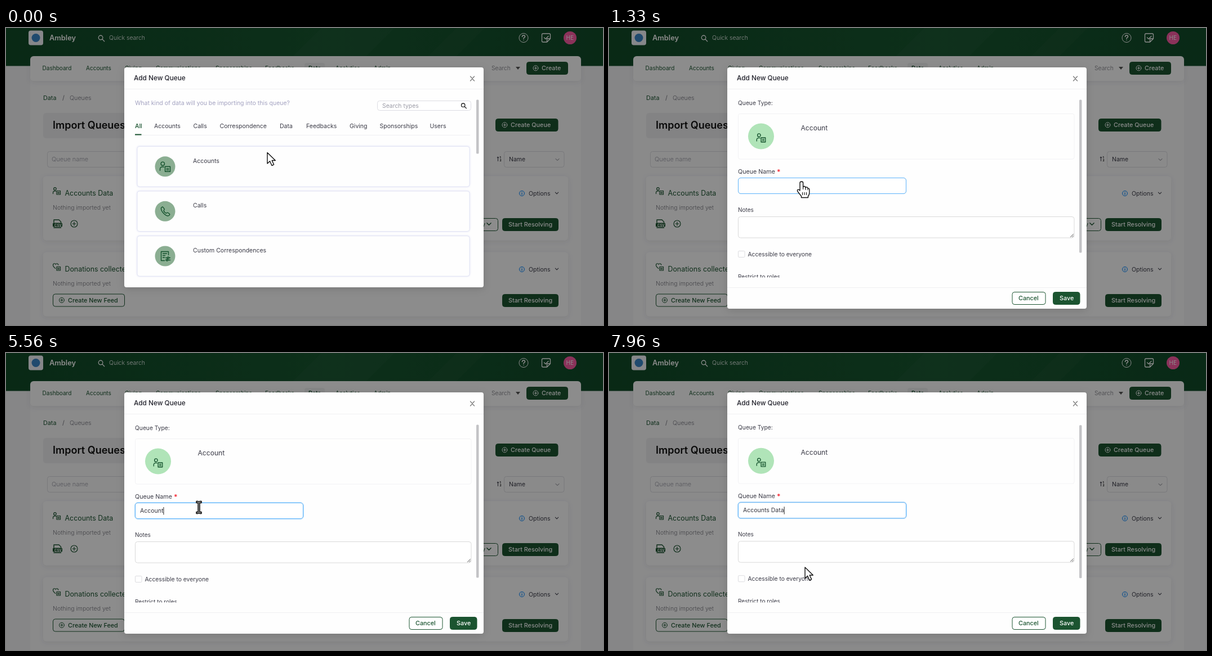
Animation, 1060 px wide and 528 px high, one loop 8 s. Source, as an HTML page:

```html
<!DOCTYPE html>
<html lang="en">
<head>
<meta charset="utf-8">
<title>Add New Queue</title>
<style>
html, body { margin: 0; width: 100%; height: 100%; overflow: hidden; background: #86868a; }
svg { display: block; width: 100%; height: 100%; }
text { font-family: Inter, "Open Sans", sans-serif; white-space: pre; }
</style>
</head>
<body>
<svg id="stage" viewBox="0 0 1060 528"></svg>
<script>
const LOOP = 8000;
const GREEN = '#1b5430', INK = '#3a3a46', MUTED = '#77777f', BLUE = '#5cb3fb';

const text = (x, y, s, size = 10.5, fill = INK, weight = 400) =>
  `<text x="${x}" y="${y}" font-size="${size}" fill="${fill}" font-weight="${weight}">${s}</text>`;
const box = (x, y, w, h, r, fill, stroke = 'none', extra = '') =>
  `<rect x="${x}" y="${y}" width="${w}" height="${h}" rx="${r}" fill="${fill}" stroke="${stroke}" ${extra}/>`;
const dot = (x, y, r, fill, stroke = 'none') =>
  `<circle cx="${x}" cy="${y}" r="${r}" fill="${fill}" stroke="${stroke}"/>`;
const line = (d, stroke, width = 1) =>
  `<path d="${d}" fill="none" stroke="${stroke}" stroke-width="${width}" stroke-linecap="round" stroke-linejoin="round"/>`;
const group = (id, body, attrs = '') => `<g id="${id}" ${attrs}>${body}</g>`;

const sheet = 'M0,0h9v9h-9zM2.5,3.3h4M2.5,6h4';
const ICONS = {
  account: 'M-1,-5a3.2,3.2 0 1 1 -6.4,0a3.2,3.2 0 1 1 6.4,0M-9,7v-2.5q0,-4 5,-4q1.5,0 2,.3' + sheet,
  heart: 'M-3,4q-6,-4 -6,-8q0,-4 3.5,-4q2,0 3,2q1,-2 3,-2q3,0 3.4,3.5' + sheet,
  phone: 'M-7,-6q2,-3 3.5,-1l2,2.6q.8,1.2 -.5,2.4q-1,1 0,2.2q1.5,2 3,3q1,.6 1.8,-.2q1.2,-1.2 2.4,-.3l2.4,1.8q1.6,1.5 -1,3.2q-3,1.6 -8,-2.8q-6.5,-6 -5.6,-10.9z',
  form: 'M6,-2V-8H-7V8H-1M-4,-4.5h7M-4,-1h4M-4,2.5h3M1,3h3M7,3h2M1,7h1M5,7h4M7,3a1.5,1.5 0 1 1 -3,0a1.5,1.5 0 1 1 3,0M5,7a1.5,1.5 0 1 1 -3,0a1.5,1.5 0 1 1 3,0',
  search: 'M3,-1a4,4 0 1 1 -8,0a4,4 0 1 1 8,0M2,2l4,4',
  plus: 'M6,0a6,6 0 1 1 -12,0a6,6 0 1 1 12,0M-3,0h6M0,-3v6',
  down: 'M-3,-1.5l3,3l3,-3',
};
const icon = (name, x, y, scale, color, width = 1.4) =>
  `<g transform="translate(${x},${y}) scale(${scale})">${line(ICONS[name], color, width / scale)}</g>`;

function button(x, y, w, label, textX, solid = true, plusX) {
  const color = solid ? '#fff' : GREEN;
  return box(x + .5, y + .5, w - 1, 22, 4, solid ? GREEN : '#fff', GREEN) +
    text(textX, y + 15, label, 10.8, color, 500) +
    (plusX ? icon('plus', plusX, y + 11.3, .75, color, 1) : '');
}

function queueCard(y, h, iconName, title) {
  return box(66, y, 932, h, 6, '#fff', 'none', 'filter="url(#soft)"') +
    icon(iconName, 90, y + 26, .72, GREEN, 1.2) +
    text(104.5, y + 34, title, 12.4, GREEN) +
    text(83, y + 59, 'Nothing imported yet', 10.5, MUTED, 300) +
    dot(916, y + 30.5, 4.6, '#e6f4ff', '#1890ff') +
    line(`M916,${y + 30}v2.6M916,${y + 28}v.1`, '#1890ff', 1.2) +
    text(928, y + 34.5, 'Options') + icon('down', 978, y + 30, .9, INK, 1) +
    button(881, y + 74.5, 100, 'Start Resolving', 892);
}

const page =
  box(0, 0, 1060, 528, 0, '#f3f3f5') +
  box(43, 60, 978, 470, 0, '#fafafb') +
  box(0, 0, 1060, 67.5, 0, 'url(#bar)') +
  '<path d="M560,0H690L622,67.5H492ZM800,0H850L782,67.5H732Z" fill="#fff" opacity=".02"/>' +
  box(40, 4.5, 26, 26, 4, '#f4f6fa') + dot(53, 17.5, 7.5, '#3a86c8') +
  text(77, 21.5, 'Ambley', 12.8, '#fff', 600) +
  icon('search', 169, 18, .95, '#fff', 1.3) + text(183, 21, 'Quick search', 10.5, '#fff', 300) +
  dot(919, 17.5, 8, 'none', '#fff') + line('M916.5,15.5q0,-2.6 2.5,-2.6t2.5,2.4q0,1.5 -2.5,2.7v1M919,21.5v.1', '#fff', 1.5) +
  line('M966.5,16V12q0,-2 -2,-2H953.5q-2,0 -2,2V23q0,2 2,2H960.5L966.5,19V16M955.5,17l2.5,2.5l5,-5M960.5,25v-6h6', '#fff', 1.3) +
  dot(1001.5, 17.5, 11.5, '#fb5aa4') + text(994.5, 21.2, 'HE', 10, '#fff') +

  box(43, 50, 978, 44, 6, '#fff', 'none', 'filter="url(#soft)"') +
  box(530, 62, 36, 20, 4, '#f2f3f4') +
  [[64.5, 'Dashboard'], [142, 'Accounts'], [211, 'Giving'], [266, 'Communications'], [372, 'Sponsorships'],
   [460, 'Feedbacks'], [537, 'Data'], [585, 'Analytics'], [653, 'Admin']]
    .map(([x, s]) => text(x, 75, s, 10.05, GREEN, s === 'Data' ? 600 : 400)).join('') +
  text(862, 75, 'Search', 10.4, MUTED, 300) + '<path d="M905,69h8l-4,5z" fill="#555"/>' +
  button(924, 60, 74, 'Create', 951, true, 940.5) +

  text(66, 127.5, 'Data', 10.8, GREEN) + text(100, 127.5, '/', 11, MUTED) + text(113, 127.5, 'Queues', 10.7, MUTED, 300) +
  box(66, 151, 760, 45, 5, '#eeeef0') + text(83, 179, 'Import Queues', 18, '#111', 600) +
  button(869, 161, 111.5, 'Create Queue', 896, true, 885.5) +
  box(73.5, 219.5, 500, 28, 4, '#fafafb', '#dcdce0') + text(81, 236.5, 'Queue name', 10.9, '#9a9aa4', 300) +
  line('M873.5,236.5v-7.5l-1.4,1.8M873.5,229l1.4,1.8', INK) + text(876.5, 232.3, '1', 5, '#111', 700) + text(876.5, 237.3, '2', 5, '#111', 700) +
  box(884.5, 219.5, 106.5, 28, 4, '#fafafb', '#dcdce0') + text(893, 236.5, 'Name') + icon('down', 979, 234, 1, MUTED, 1) +

  queueCard(263.5, 114, 'account', 'Accounts Data') +
  line('M85,346V341H94L97.5,344.5V346M85,355H97.5', GREEN, 1.4) + box(83, 346.5, 17, 7, 1.5, GREEN) + text(86, 352.5, 'CSV', 6, '#fff', 700) +
  icon('plus', 121, 348, 1, GREEN, 1.2) +
  box(700, 338.5, 173.5, 22, 4, '#fff', GREEN) + text(845, 352.5, 'y', 10.8, GREEN) + icon('down', 857.5, 348.5, 1.2, GREEN) +
  queueCard(398.5, 114, 'heart', 'Donations collected') +
  button(83, 472.5, 128, 'Create New Feed', 110, false, 99) +
  box(0, 0, 1060, 528, 0, '#000', 'none', 'opacity=".45"');

const typeCard = (y, name, label, id) =>
  `<rect id="${id}" x="233" y="${y}" width="590" height="71.5" rx="4" fill="#fefefe" stroke="#e2e4f4" filter="url(#halo)"/>` +
  dot(282.5, y + 35.8, 18, '#8bae92') + icon(name, 282.5, y + 35.8, 1, '#12502b', 1.4) +
  text(332, y + 29, label);

const picker =
  text(229, 137.3, 'What kind of data will you be importing into this queue?', 10.5, '#a3a2c0') +
  box(659.5, 129.5, 166, 17, 4, '#fff', '#dcdce2') + text(668, 141.5, 'Search types', 10.4, '#9b9ba6') +
  icon('search', 812.5, 138, .8, '#222', 1.3) +
  [[229, 'All'], [263, 'Accounts'], [332.5, 'Calls'], [379.5, 'Correspondence'], [486, 'Data'], [533, 'Feedbacks'],
   [610, 'Giving'], [663.5, 'Sponsorships'], [752.5, 'Users']]
    .map(([x, s]) => text(x, 177.5, s, 10.5, s === 'All' ? GREEN : INK, s === 'All' ? 500 : 400)).join('') +
  line('M229,190.5H824', '#efeff2') + box(229, 188.5, 11.5, 2, 0, GREEN) +
  typeCard(210.5, 'account', 'Accounts', 'hoverCard') +
  typeCard(290, 'phone', 'Calls', 'callsCard') +
  typeCard(369.7, 'form', 'Custom Correspondences', 'customCard');

const form = group('fields',
  text(229, 137.3, 'Queue Type:', 10.25) +
  box(229.5, 152.5, 596.5, 80.5, 3, '#fefefe', '#f2f2f4') +
  dot(270, 192.5, 23, '#b0e4b8') + icon('account', 270, 195, .86, '#12502b', 1.3) +
  text(340.5, 182.3, 'Account', 12.1) +
  text(229, 258.5, 'Queue Name', 10.7) + text(298, 260, '*', 12, '#f5222d', 600) +
  box(228.5, 265.5, 300, 30, 5.5, 'none', BLUE, 'id="glow" stroke-opacity=".4"') +
  box(229.5, 266.5, 298, 28, 4.5, '#fff', '#d9d9d9') +
  box(229.5, 266.5, 298, 28, 4.5, 'none', BLUE, 'id="edge"') +
  '<text id="typed" x="238" y="284.3" font-size="10.5" fill="#33333d"></text>' +
  '<rect id="caret" y="274" width="1" height="13.5" fill="#222"/>' +
  text(229, 327, 'Notes', 10) +
  box(229.5, 335.5, 596.5, 37.5, 4, '#fff', '#d9d9d9') + line('M819.5,371.5l5,-5M822.5,371.5l2,-2', '#555') +
  box(229.5, 396.5, 11.5, 11, 1.5, '#fff', '#dcdce0') + text(246.5, 405.5, 'Accessible to everyone', 10.3) +
  text(229, 445.5, 'Restrict to roles', 10.15));

const modal =
  '<rect id="panel" x="210" y="70" width="638" rx="4" fill="#fefefe" filter="url(#lift)"/>' +
  text(227, 92.7, 'Add New Queue', 11.8, '#22222c', 500) +
  line('M824.5,86l7,8M831.5,86l-7,8', '#777', 1.2) + line('M210.5,108.5H847.5', '#f0f0f2') +
  `<g clip-path="url(#body)">${group('picker', picker)}${group('form', form)}</g>` +
  group('footer', line('M210.5,461.5H847.5', '#f0f0f2') +
    button(715.5, 469, 60, 'Cancel', 727, false) + button(788, 469, 48.5, 'Save', 800)) +
  '<rect id="scroll" x="835" width="4.5" rx="1.5" fill="#c3c3c6"/>';

const cursors =
  group('arrow', '<path d="M0,0V19.5L4.6,15.3L8,23L11.6,21.4L8.2,14H14.3Z"/>') +
  group('hand', '<path d="M-3,1.5Q-3,-1 0,-1Q2.6,-1 2.6,1.5V9Q3,7.2 5,7.5Q7,7.8 7,10Q7.6,8.6 9.4,9Q11,9.4 11,11.3Q14,10.5 13.8,14V19Q13.8,22.5 11.5,25V27.5H-.5V25L-6.8,17Q-8.5,14.3 -6.5,13.2Q-5,12.6 -3,15Z"/><path d="M2.6,9v4M7,10v4M11,11.3v3M1.5,18v5M5,18v5M8.5,18v5" fill="none" stroke-width="1.1"/>') +
  group('beam', '<path d="M-4.5,-11H-1.5L0,-10L1.5,-11H4.5V-8H1.5V8H4.5V11H1.5L0,10L-1.5,11H-4.5V8H-1.5V-8H-4.5Z" fill="#999" stroke-width="1.5"/>');

const shadow = (id, dy, blur, color, opacity) =>
  `<filter id="${id}" x="-20%" y="-40%" width="140%" height="180%"><feDropShadow dx="0" dy="${dy}" stdDeviation="${blur}" flood-color="${color}" flood-opacity="${opacity}"/></filter>`;

const stage = document.getElementById('stage');
stage.innerHTML = `<defs>
  ${shadow('soft', 2, 4, '#556', .1)}${shadow('halo', 0, 1.5, '#8c90d8', .3)}${shadow('lift', 3, 7, '#000', .14)}
  <linearGradient id="bar"><stop offset="0" stop-color="#104a27"/><stop offset=".55" stop-color="#17562f"/><stop offset="1" stop-color="#104a28"/></linearGradient>
  <clipPath id="body"><rect x="211" y="110" width="636" height="333.5"/></clipPath></defs>` +
  page + modal + group('cursor', cursors, 'fill="#fff" stroke="#111" stroke-width="1.4" stroke-linejoin="round"');

const el = {};
stage.querySelectorAll('[id]').forEach(node => el[node.id] = node);
const show = (node, on) => node.setAttribute('visibility', on ? 'visible' : 'hidden');
const ramp = (t, from, to) => Math.min(1, Math.max(0, (t - from) / (to - from)));
const ease = u => u * u * (3 - 2 * u);

// [time, characters in the field]; 4630 is a backspace
const KEYS = [[2000, 0], [2760, 1], [2930, 2], [3060, 3], [3530, 4], [4630, 3], [4900, 4], [5130, 5], [5330, 6],
  [5560, 7], [5700, 8], [5860, 9], [6230, 10], [6360, 11], [6500, 12], [6660, 13]];

function pointer(t) {
  if (t < 2000) {
    const u = ease(ramp(t, 290, 500));
    return [464 - 122 * u, 221.5 + 52.5 * u, t < 330 ? 'arrow' : 'hand'];
  }
  const u = ease(ramp(t, 7370, 7730));
  const x = 342.5 + 5.5 * u + 11 * Math.sin(Math.PI * u), y = 274.5 + 106.5 * u;
  const overField = y < 295 || (y > 335 && y < 373);
  return [x, y, overField ? 'beam' : 'arrow'];
}

function draw(t) {
  const inForm = t >= 1030, scrolled = t >= 7960 ? 1 : 0;
  show(el.picker, !inForm);
  show(el.form, inForm);
  show(el.footer, inForm);
  el.panel.setAttribute('height', inForm ? 429 : 391);
  el.hoverCard.setAttribute('fill', t >= 900 ? '#f6f6fa' : '#fefefe');
  el.scroll.setAttribute('y', 127.5 + scrolled * .7);
  el.scroll.setAttribute('height', inForm ? 272 : 96);
  el.fields.setAttribute('transform', `translate(0,${-scrolled * .8})`);

  el.edge.setAttribute('opacity', ramp(t, 1030, 1330));
  el.glow.setAttribute('opacity', ramp(t, 1980, 2230));
  const key = KEYS.filter(([time]) => time <= t).pop();
  el.typed.textContent = 'Accounts Data'.slice(0, key ? key[1] : 0);
  const width = key && key[1] ? el.typed.getComputedTextLength() : 0;
  el.caret.setAttribute('x', 238 + width);
  show(el.caret, key && (t - key[0]) % 1060 < 530);

  const [x, y, shape] = pointer(t);
  el.cursor.setAttribute('transform', `translate(${x},${y})`);
  for (const name of ['arrow', 'hand', 'beam']) show(el[name], name === shape);
}

function tick() {
  draw(performance.now() % LOOP);
  requestAnimationFrame(tick);
}
tick();
</script>
</body>
</html>
```
